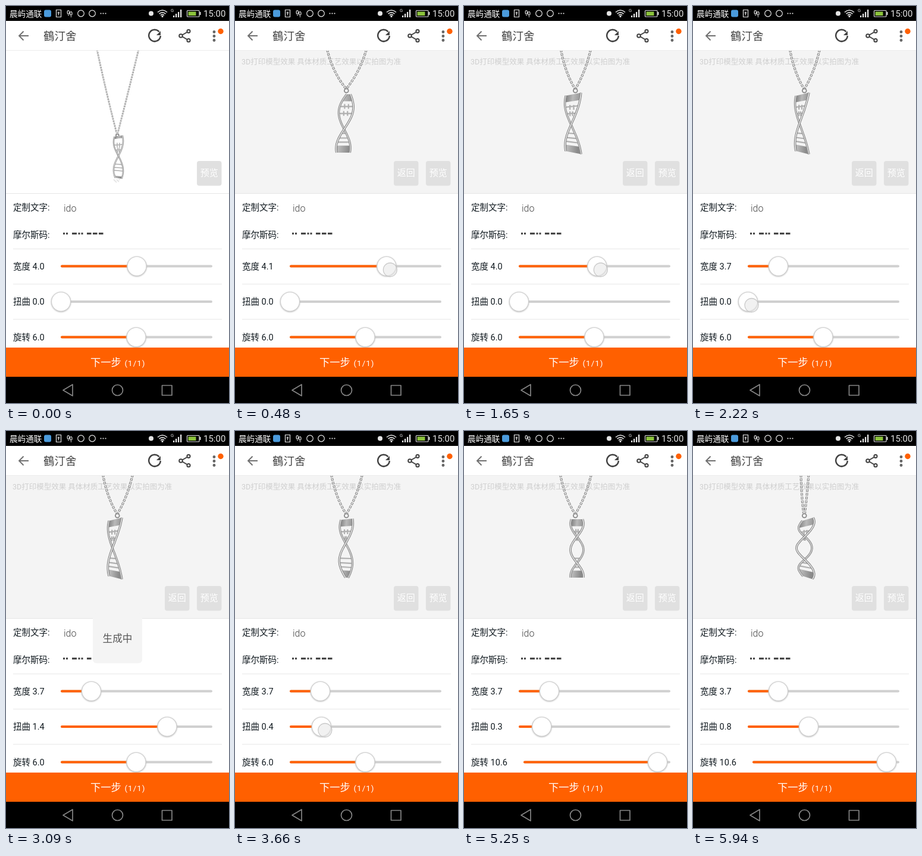
Animation, 375 px wide and 666 px high, one loop 5.97 s. Source, as an HTML page:

```html
<!DOCTYPE html>
<html lang="zh">
<head>
<meta charset="utf-8">
<title>Pendant customiser</title>
<style>
html, body { margin: 0; width: 100%; height: 100%; overflow: hidden; background: #fff; }
svg { display: block; width: 375px; height: 666px; font-family: Roboto, "Noto Sans CJK SC", "Noto Sans CJK", sans-serif; }
</style>
</head>
<body>
<svg id="stage" viewBox="0 0 375 666" fill="none">
  <defs>
    <linearGradient id="metal" x1="0" y1="0" x2="1" y2="0.4">
      <stop offset="0" stop-color="#777"/>
      <stop offset=".45" stop-color="#b9b9b9"/>
      <stop offset="1" stop-color="#8a8a8a"/>
    </linearGradient>
    <filter id="soft" x="-30%" y="-30%" width="160%" height="160%">
      <feGaussianBlur stdDeviation="1"/>
    </filter>
  </defs>
  <rect width="375" height="666" fill="#fff"/>
  <rect id="view" y="74" width="375" height="241"/>
  <text id="caption" x="11" y="97.5" font-size="12.5" fill="#cfcfcf">3D打印模型效果 具体材质工艺效果以实拍图为准</text>

  <g id="pendant" stroke-linecap="butt" stroke-linejoin="round">
    <path id="chainDark" stroke="#8d8d8d"/>
    <path id="chainLight" stroke="#f2f2f2"/>
    <circle id="ring" stroke="#8a8a8a" stroke-width="1.8"/>
    <path id="plates" fill="url(#metal)"/>
    <path id="rungs" stroke="#b0b0b0"/>
    <path id="backDark" stroke="#8b8b8b"/>
    <path id="backLight" stroke="#cfcfcf"/>
    <path id="frontDark" stroke="#7d7d7d"/>
    <path id="frontLight" stroke="#e6e6e6"/>
    <path id="shine" d="M181 291l5 5M186 291l4 4M190 290l1 2" stroke="#e6e6e6" stroke-width="2"/>
  </g>

  <path id="edge" d="M0 314.5H375" stroke="#e6e6e6"/>
  <g id="buttons" font-size="15" text-anchor="middle">
    <g id="back">
      <rect x="267" y="260" width="41.5" height="41.5" rx="4" fill="#e0e0e0"/>
      <text x="287.7" y="285" fill="#fff">返回</text>
    </g>
    <rect x="321" y="260" width="41.5" height="41.5" rx="4" fill="#e0e0e0"/>
    <text x="341.7" y="285" fill="#fff">预览</text>
  </g>

  <g font-size="14.5" fill="#10191f">
    <text x="12" y="342.5">定制文字:</text>
    <text x="12" y="388.5">摩尔斯码:</text>
    <text x="97" y="345" font-size="16" font-weight="300" fill="#444">ido</text>
  </g>
  <path d="M96 381.7h3M101 381.7h3M111 381.7h8M121.500 381.7h3M126.500 381.7h3M136 381.7h7.500M146 381.7h7.500M156 381.7h7.500" stroke="#3c3c3c" stroke-width="3"/>
  <path d="M12 407.500H363M12 466.500H363M12 525.500H363" stroke="#e8e8e8"/>
  <g id="sliders"></g>

  <rect y="573" width="375" height="49" fill="#ff6000"/>
  <g fill="#fff">
    <text x="142" y="604" font-size="17.3">下一步</text>
    <text x="199.500" y="604" font-size="13.500" letter-spacing="1">(1/1)</text>
  </g>
  <rect y="622" width="375" height="44" fill="#000"/>
  <g stroke="#858585" stroke-width="1.7" stroke-linejoin="round">
    <path d="M96 644.500L112 635V654Z"/>
    <circle cx="187.500" cy="644.500" r="9"/>
    <rect x="262.500" y="636.500" width="16.500" height="16.500"/>
  </g>

  <rect width="375" height="25" fill="#000"/>
  <text x="6" y="17.500" font-size="13.600" fill="#fff">晨屿通联</text>
  <rect x="64" y="6.500" width="12" height="12" rx="3" fill="#4b9bdc"/>
  <g stroke="#e4e4e4" stroke-width="1.2">
    <path d="M84.500 6.500h8v12h-8zM88.500 9.500v6M86.500 11.500h4"/>
    <ellipse cx="104.800" cy="10.500" rx="1.700" ry="3"/>
    <ellipse cx="109.300" cy="12.500" rx="1.700" ry="3"/>
    <path d="M104 15.500h2M108.500 17.800h2"/>
    <circle cx="126" cy="12.500" r="5.300"/>
    <circle cx="145" cy="12.500" r="5.300"/>
  </g>
  <g fill="#e4e4e4">
    <circle cx="159.500" cy="12.500" r="1.100"/>
    <circle cx="163.500" cy="12.500" r="1.100"/>
    <circle cx="167.500" cy="12.500" r="1.100"/>
    <circle cx="244" cy="12.500" r="4"/>
    <circle cx="263" cy="17.500" r="1.600"/>
    <text x="277" y="9.500" font-size="7.500">G</text>
    <path d="M281 16h2.300v3h-2.300zM285 13h2.300v6h-2.300zM289 10h2.300v9h-2.300zM293 6h2.300v13h-2.300z"/>
    <rect x="325.500" y="10" width="2" height="5"/>
    <text x="332" y="18" font-size="15">15:00</text>
  </g>
  <path d="M255 10.500q8-7 16 0M257.500 13.200q5.500-4.700 11 0M260 15.700q3-2.500 6 0" stroke="#e4e4e4" stroke-width="1.600"/>
  <rect x="304.500" y="7.500" width="20.500" height="10.500" rx="1" stroke="#ddd" stroke-width="1.200"/>
  <rect x="306.500" y="9.500" width="13" height="6.500" fill="#8cc33c"/>

  <rect y="25" width="375" height="49" fill="#fff"/>
  <path d="M0 74.500H375" stroke="#ececec"/>
  <path d="M38 50H22.500M29.500 42.500L22 50L29.500 57.500" stroke="#707070" stroke-width="1.900"/>
  <text x="63" y="57" font-size="18.500" fill="#444">鶴汀舍</text>
  <g stroke="#424242" stroke-width="2.500">
    <path d="M257.500 43.200A9.800 9.800 0 1 0 259.800 50"/>
    <path d="M260 42V49H253Z" fill="#424242" stroke="none"/>
    <path d="M307 42.500L294 50L307 57.500" stroke-width="2"/>
    <g fill="#fff" stroke-width="2">
      <circle cx="294" cy="50" r="2.800"/>
      <circle cx="307" cy="42.300" r="2.600"/>
      <circle cx="307" cy="57.700" r="2.600"/>
    </g>
  </g>
  <g fill="#666">
    <circle cx="350" cy="43.500" r="2.400"/>
    <circle cx="350" cy="50.500" r="2.400"/>
    <circle cx="350" cy="57.500" r="2.400"/>
    <circle cx="361" cy="42.500" r="4.700" fill="#ff6000"/>
  </g>

  <g id="toast">
    <rect x="146" y="306" width="83" height="83.500" rx="6" fill="#f4f4f4"/>
    <text x="187.500" y="354" font-size="16.600" text-anchor="middle" fill="#555">生成中</text>
  </g>
  <circle id="touch" r="11.500" fill="#e6e6e6" fill-opacity=".55" stroke="#bdbdbd" stroke-opacity=".8" stroke-width="1.300"/>
</svg>
<script>
const LOOP = 5970, STEP = 30, OPEN = 120;
const $ = id => document.getElementById(id);
const set = (el, attrs) => { for (const k in attrs) el.setAttribute(k, attrs[k]); };
const show = (el, on) => set(el, { visibility: on ? "visible" : "hidden" });
const mix = (a, b, p) => a + (b - a) * p;
const clamp = p => Math.max(0, Math.min(1, p));
const ease = p => p * p * (3 - 2 * p);

// Each drag: start, end, value before, value after.
const sliders = [
  { name: "宽度", y: 436.5, dy: 6, frac: v => v - 3.5,
    drags: [[330, 570, 4, 4.2], [810, 1080, 4.2, 4.5], [1530, 1740, 4.5, 3.7]] },
  { name: "扭曲", y: 496, dy: 6, frac: v => v / 2,
    drags: [[2250, 2490, 0, 0.4], [2730, 3060, 0.4, 1.4], [3300, 3750, 1.4, 0.3], [5490, 5670, 0.3, 0.8]] },
  { name: "旋转", y: 555.5, dy: 13.5, frac: v => 0.496 + (v - 6) * 0.0907,
    drags: [[4290, 4470, 6, 8.3], [4830, 5190, 8.3, 10.6]] }
];

const toasts = [[600, 780], [1110, 1320], [1770, 2040], [2520, 2700], [3090, 3240],
  [3780, 4020], [4500, 4740], [5280, 5370], [5700, 5940]];

// time, turn duration, phase, twist, radius, centre, lean, bow, skew, chain spread
const poses = [
  [120, 0, -1.3, 4.8, 12, 182, 9, 0, 0, 33],
  [780, 0, -1.3, 4.8, 13, 182, 9, 0, 0, 33],
  [1290, 0, -1.3, 4.8, 14, 182, 9, 0, 0, 33],
  [1320, 180, -0.2, 3.4, 13, 180, 0, 4, 0.2, 25],
  [2010, 0, 0, 3.14, 11, 179, 0, 5, 0.25, 25],
  [2700, 0, -0.05, 3.3, 11, 179, 0, 5, 0.25, 25],
  [3240, 0, -0.5, 5, 11, 186, 0, 2, 0.1, 26],
  [4020, 0, -0.6, 3.9, 11, 190, 0, 0, 0, 26],
  [4740, 0, -0.53, 7, 11, 190, 0, 0, 0, 26],
  [5370, 90, -0.6, 7.4, 12, 188, 0, 4, 0.2, 6.5],
  [5940, 0, -0.8, 8, 13, 187, 0, 6, 0.3, 6.5]
];
const photo = [-0.6, 4.6, 8, 189, 0, 0, 0.15, 35];

function addNode(parent, tag, attrs) {
  const el = document.createElementNS("http://www.w3.org/2000/svg", tag);
  set(el, attrs);
  parent.appendChild(el);
  return el;
}

for (const s of sliders) {
  const g = $("sliders"), line = { "stroke-width": 4, "stroke-linecap": "round" };
  s.label = addNode(g, "text", { x: 12, y: s.y + 5, "font-size": 14.5, fill: "#10191f" });
  s.track = addNode(g, "path", { ...line, stroke: "#d0d0d0" });
  s.fill = addNode(g, "path", { ...line, stroke: "#ff6000" });
  s.shadow = addNode(g, "circle", { cy: s.y + 0.7, r: 16.7, fill: "#bbb", filter: "url(#soft)" });
  s.thumb = addNode(g, "circle", { cy: s.y, r: 16, fill: "#fff", stroke: "#cfcfcf", "stroke-width": 1.2 });
}

function valueAt(drags, t) {
  let v = drags[0][2];
  for (const [a, b, from, to] of drags) if (t >= a) v = mix(from, to, ease(clamp((t - a) / (b - a))));
  return v;
}

function drawSlider(s, t) {
  const v = valueAt(s.drags, t), left = v >= 9.95 ? 102 : 94;
  const x = mix(left - 2, 347, s.frac(v)) + (s.frac(v) < 0.9 ? 0.5 : 0);
  s.label.textContent = s.name + " " + v.toFixed(1);
  set(s.track, { d: `M${left} ${s.y}H345` });
  set(s.fill, { d: `M${left} ${s.y}H${Math.max(left, x)}` });
  set(s.shadow, { cx: x });
  set(s.thumb, { cx: x });
  return s.drags.some(([a, b]) => t >= a - 30 && t <= b) ? [x + (s.dy > 10 ? -2 : 6), s.y + s.dy] : null;
}

function poseAt(t) {
  let i = 0;
  while (i + 1 < poses.length && poses[i + 1][0] <= t) i++;
  const [start, dur, ...now] = poses[i];
  if (!dur) return now;
  const before = poses[i - 1].slice(2), p = ease(clamp((t - start) / dur));
  return now.map((n, k) => mix(before[k], n, p));
}

function drawPendant(pose, isPhoto) {
  const [phase, twist, radius, cx, lean, bow, skew, spread] = pose;
  const top = isPhoto ? 218 : 148, height = isPhoto ? 71 : 98, hook = isPhoto ? 213 : 138;
  const thin = isPhoto ? 0.7 : 1;

  const at = (u, side) => {
    const dx = side * radius * Math.cos(phase + twist * u);
    const mid = cx + lean * (1 - u) ** 2 + bow * (1 - 2 * u) ** 2;
    return [mid + dx, top + height * u + skew * dx * (2 * u - 1)];
  };
  const points = (side, a, b) => Array.from({ length: 31 }, (_, i) =>
    at(mix(a, b, i / 30), side).map(n => n.toFixed(1)).join(" "));
  const strand = side => "M" + points(side, 0, 1).join("L");
  const plate = (a, b) => "M" + points(-1, a, b).concat(points(1, a, b).reverse()).join("L") + "Z";
  const rung = u => `M${at(u, -1)}L${at(u, 1)}`;
  const stub = u => {
    const [a, y] = at(u, -1), [b] = at(u, 1);
    return `M${mix(a, b, 0.36)} ${y - 4}v8M${mix(a, b, 0.64)} ${y - 4}v8`;
  };

  set($("plates"), { d: plate(0, isPhoto ? 0.06 : 0.12) + plate(isPhoto ? 0.95 : 0.88, 1) });
  set($("rungs"), {
    d: [0.21, 0.33, 0.67, 0.75, 0.82].map(rung).join("") + [0.21, 0.33].map(stub).join(""),
    "stroke-width": 2.2 * thin
  });
  for (const [name, side] of [["back", -1], ["front", 1]]) {
    set($(name + "Dark"), { d: strand(side), "stroke-width": 3.6 * thin });
    set($(name + "Light"), { d: strand(side), "stroke-width": 1.7 * thin });
  }

  const bend = isPhoto ? 0.53 : 0.7, low = isPhoto ? 145 : 110;
  const chain = [-1, 1].map(s =>
    `M${188 + s * spread} 73Q${187 + s * spread * bend} ${low} ${187 + s} ${hook}`).join("");
  set($("chainDark"), { d: chain, "stroke-width": isPhoto ? 2.6 : 4, "stroke-dasharray": isPhoto ? "3 1.2" : "4.5 1.7" });
  set($("chainLight"), { d: chain, "stroke-width": isPhoto ? 1 : 1.6, "stroke-dasharray": isPhoto ? "2 2.2" : "3 3.2", "stroke-dashoffset": -0.6 });
  set($("ring"), { cx: 187.3, cy: hook + 4, r: isPhoto ? 2.4 : 3.4 });
}

function render(time) {
  const t = Math.floor((time % LOOP) / STEP) * STEP;
  const isPhoto = t < OPEN;
  set($("view"), { fill: isPhoto ? "#fff" : "#f4f4f4" });
  show($("caption"), !isPhoto);
  show($("back"), !isPhoto);
  show($("shine"), isPhoto);
  drawPendant(isPhoto ? photo : poseAt(t), isPhoto);

  let touch = t >= 60 && t < OPEN ? [343, 283] : null;
  for (const s of sliders) touch = drawSlider(s, t) || touch;
  show($("touch"), !!touch);
  if (touch) set($("touch"), { cx: touch[0], cy: touch[1] });
  show($("toast"), toasts.some(([a, b]) => t >= a && t < b));
}

const begin = performance.now();
function tick() {
  render(performance.now() - begin);
  requestAnimationFrame(tick);
}
tick();
</script>
</body>
</html>
```
